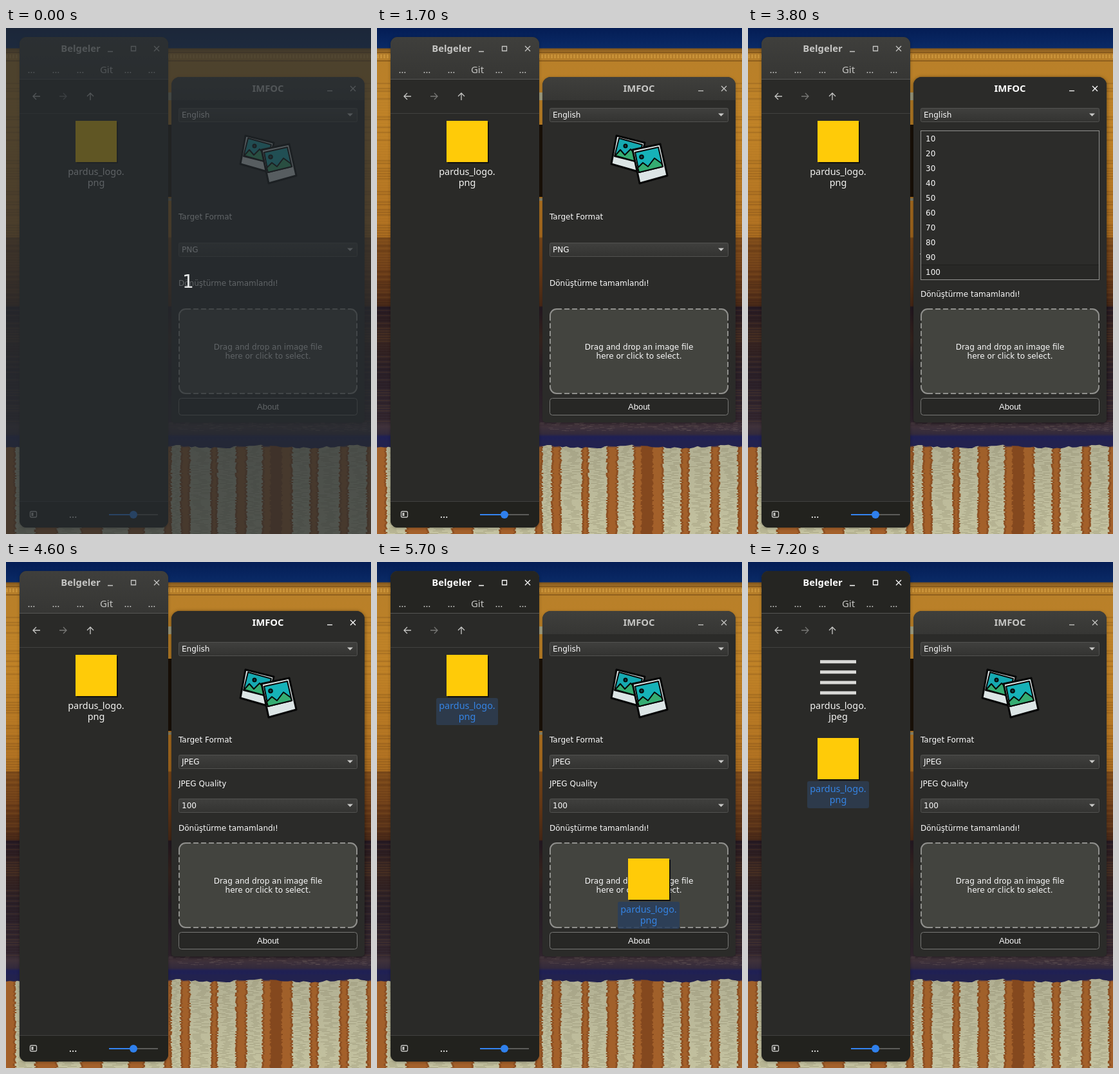
Write an HTML page with a canvas that moves like this. It is 567x785 px and loops after 8 s.

```html
<!DOCTYPE html>
<html lang="en">
<head>
<meta charset="utf-8">
<title>Image converter demo</title>
<style>
html, body { margin: 0; width: 100%; height: 100%; overflow: hidden; background: #1a1626; }
canvas, svg { position: absolute; left: 0; top: 0; width: 567px; height: 785px; }
svg { color: #c6c6c4; }
text { white-space: pre; }
.ui { font: 14.4px "Noto Sans", sans-serif; fill: #f4f4f2; text-anchor: middle; }
.menu { font-size: 15px; fill: #c4c4c2; }
.title { font-size: 14.8px; font-weight: 700; fill: currentColor; }
.app { font: 12px "DejaVu Sans", sans-serif; fill: #fafafa; }
.mid { text-anchor: middle; }
.line { fill: none; stroke: currentColor; stroke-width: 1.3; }
.blue { fill: #3584e4; }
.lit { color: #fff; }
.shadow { filter: drop-shadow(0 1px 2px rgba(0,0,0,.3)); }
.deep { filter: drop-shadow(0 1px 3px rgba(0,0,0,.3)); }

[id^="t-"] { animation: 8s step-end infinite; }
#t-veil { animation-name: veil; }
#t-right { animation-name: right; }
#t-left, #t-selected { animation-name: select; }
#t-plain { animation-name: plain; }
#t-short { animation-name: short; }
#t-long { animation-name: long; }
#t-press { animation-name: press; }
#t-formats { animation-name: formats; }
#t-levels { animation-name: levels; }
#t-glow { animation-name: glow; }
#t-tint { animation-name: tint; }
#t-item { animation-name: item; }
#t-result { animation-name: result; }
#t-drag { animation-name: drag; }
@keyframes veil { 0% { opacity: 1 } 1.25%, to { opacity: 0 } }
@keyframes right { 0% { opacity: 0 } 27.5% { opacity: 1 } 65%, to { opacity: 0 } }
@keyframes select { 0% { opacity: 0 } 65%, to { opacity: 1 } }
@keyframes plain { 0% { opacity: 1 } 65%, to { opacity: 0 } }
@keyframes short { 0% { opacity: 1 } 36.25%, to { opacity: 0 } }
@keyframes long { 0% { opacity: 0 } 36.25%, to { opacity: 1 } }
@keyframes press { 0% { opacity: 0 } 28.75% { opacity: 1 } 36.25%, to { opacity: 0 } }
@keyframes formats { 0% { opacity: 0 } 30% { opacity: .5 } 31.25% { opacity: 1 } 36.25%, to { opacity: 0 } }
@keyframes levels { 0% { opacity: 0 } 46.25% { opacity: .5 } 47.5% { opacity: 1 } 57.5%, to { opacity: 0 } }
@keyframes glow {
  0%, 21.25%, 66.25%, 80%, 90%, to { opacity: 0 }
  11.25%, 61.25%, 78.75%, 88.75% { opacity: 1 }
}
@keyframes tint { 0%, 21.25%, 65%, to { opacity: 0 } 11.25%, 61.25% { opacity: 1 } }
@keyframes item { 0% { transform: none } 75%, to { transform: translateY(129px) } }
@keyframes result { 0% { opacity: 0 } 75%, to { opacity: 1 } }
@keyframes drag {
  0% { opacity: 0; transform: none }
  66.25% { opacity: 1; transform: translate(26px, 30px) }
  67.5% { opacity: 1; transform: translate(92px, 104px) }
  68.75% { opacity: 1; transform: translate(180px, 204px) }
  70% { opacity: 1; transform: translate(252px, 284px) }
  71.25% { opacity: 1; transform: translate(282px, 316px) }
  72.5%, to { opacity: 0; transform: none }
}
</style>
</head>
<body>
<canvas id="wall" width="567" height="785"></canvas>
<svg viewBox="0 0 567 785">
  <defs>
    <linearGradient id="bar" x2="0" y2="1"><stop stop-color="#3f3f3c"/><stop offset="1" stop-color="#363634"/></linearGradient>
    <linearGradient id="box" x2="0" y2="1"><stop stop-color="#40403e"/><stop offset="1" stop-color="#333331"/></linearGradient>
    <path id="leftTop" d="M21 79V25a11 11 0 0 1 11-11H241a11 11 0 0 1 11 11V79z"/>
    <path id="pane" d="M257 89a13 13 0 0 1 13-13H544a13 13 0 0 1 13 13V607a5 5 0 0 1-5 5H262a5 5 0 0 1-5-5z" fill="#2b2b29"/>
    <path id="close" d="M-4-4 4 4M4-4-4 4"/>
    <path id="arrow" d="M6 0H-5M0-5-5 0 0 5"/>
    <g id="leftBar">
      <text class="ui title" x="116" y="37">Belgeler</text>
      <path class="line" d="M158 36.5h8M194.5 28.5h7v7h-7z"/>
      <use href="#close" class="line" x="234" y="32"/>
    </g>
    <g id="rightBar">
      <text class="ui title" x="407" y="99">IMFOC</text>
      <path class="line" d="M499 97.5h8"/>
      <use href="#close" class="line" x="539" y="94"/>
    </g>
    <g id="thumb"><path d="M110 146h64v64h-64z" fill="#11110f"/><path d="M108 144h64v64h-64z" fill="#ffcb08"/></g>
    <rect id="chip" x="92" y="211" width="96" height="42" rx="3"/>
    <g id="pngName"><text x="140" y="228">pardus_logo.</text><text x="140" y="245">png</text></g>
  </defs>

  <!-- File manager -->
  <rect class="shadow" x="21" y="14" width="231" height="761" rx="11" fill="#2a2a28"/>
  <use href="#leftTop" fill="url(#bar)"/>
  <use href="#leftBar"/>
  <g id="t-left"><use href="#leftTop" fill="#252522"/><use href="#leftBar" class="lit"/></g>
  <path d="M21 735H252V764a11 11 0 0 1-11 11H32a11 11 0 0 1-11-11z" fill="#22221e"/>
  <path d="M21 79.5H252" stroke="#565654"/>
  <path d="M21 132.5H252M21 734.5H252" stroke="#41413f"/>
  <g class="ui menu" id="menu"></g>
  <use href="#arrow" class="line" x="47" y="106"/>
  <use href="#arrow" class="line" transform="translate(89 106) scale(-1 1)" opacity=".5"/>
  <use href="#arrow" class="line" transform="translate(131 106) rotate(90)"/>
  <rect class="line" x="37.5" y="750" width="10" height="9" rx="2"/>
  <path d="M39.5 752h3v5h-3z" fill="#c6c6c4"/>
  <text class="ui" x="104" y="760" style="font-size:16px">…</text>
  <path d="M198 755h38" stroke="#5c5c59" stroke-width="2"/>
  <path d="M160 755h38" stroke="#3584f0" stroke-width="2"/>
  <circle cx="198" cy="755" r="6" fill="#2f80ed"/>

  <g id="t-result">
    <path d="M112 154.7h56m-56 16.1h56m-56 16.1h56m-56 16.1h56" stroke="#dadad8" stroke-width="5"/>
    <g class="ui"><text x="140" y="228">pardus_logo.</text><text x="140" y="245">jpeg</text></g>
  </g>
  <g id="t-item">
    <use href="#thumb"/>
    <g id="t-glow"><path d="M108 144h64v64h-64z" fill="#fff012"/></g>
    <g id="t-tint"><use href="#chip" fill="#fff" opacity=".07"/></g>
    <g id="t-plain" class="ui"><use href="#pngName"/></g>
    <g id="t-selected" class="ui blue"><use href="#chip" fill="#2d3a4b"/><use href="#pngName"/></g>
  </g>

  <!-- Converter -->
  <use href="#pane" class="shadow"/>
  <path d="M257 112V89a13 13 0 0 1 13-13H544a13 13 0 0 1 13 13V112z" fill="url(#bar)"/>
  <use href="#rightBar"/>
  <g id="t-right"><use href="#pane" class="deep"/><use href="#rightBar" class="lit"/></g>
  <g id="language"></g>

  <g stroke="#060606" stroke-width="3" stroke-linejoin="round">
    <path d="M372 167 416 178 406 223 364 211z" fill="#dce5e5"/>
    <g stroke-width="2">
      <path d="M376 171 412 181 405 208 369 199z" fill="#16a9b1"/>
      <path d="M370 198 378 189 385 197 394 188 407 202 405 208z" fill="#35ad72"/>
      <circle cx="386" cy="183" r="2.5" fill="#104c50"/>
    </g>
    <path d="M397 189 440 180 451 229 408 241z" fill="#dce5e5"/>
    <g stroke-width="2">
      <path d="M401 193 437 185 444 215 407 224z" fill="#16b2b8"/>
      <path d="M405 217 413 209 421 215 431 202 442 210 444 215 407 224z" fill="#35ad72"/>
      <circle cx="411" cy="200" r="2.8" fill="#104c50"/>
    </g>
  </g>

  <g id="t-short"></g>
  <g id="t-long"></g>
  <g id="t-press"><rect x="269" y="333" width="276" height="20" rx="2" fill="#000" opacity=".2"/></g>
  <rect x="269" y="436" width="276" height="131" rx="10" fill="#43443f"/>
  <g fill="none" stroke="#90908d" stroke-width="2">
    <path d="M269 446a10 10 0 0 1 10-10M535 436a10 10 0 0 1 10 10M545 557a10 10 0 0 1-10 10M279 567a10 10 0 0 1-10-10"/>
    <path d="M279 436H535M279 567H535M269 446V557M545 446V557" stroke-dasharray="8 4"/>
  </g>
  <g class="app mid">
    <text x="407" y="499">Drag and drop an image file</text>
    <text x="407" y="513">here or click to select.</text>
  </g>
  <rect x="268.5" y="574.5" width="277" height="26" rx="4" fill="#272725" stroke="#777775"/>
  <text class="mid" x="407" y="592" fill="#fafafa" font-family="Liberation Sans, Arial, sans-serif" font-size="13">About</text>
  <g id="t-formats"></g>
  <g id="t-levels"></g>

  <g id="t-drag" class="ui blue">
    <use href="#thumb"/>
    <use href="#chip" fill="#2a3f5c" opacity=".85"/>
    <use href="#pngName"/>
  </g>

  <g id="t-veil">
    <path d="M0 0h567v785H0z" fill="#252b2f" opacity=".73"/>
    <text x="283" y="403" class="mid" font-family="DejaVu Sans, sans-serif" font-size="28" fill="#e4e6e6">1</text>
  </g>
</svg>
<script>
const put = (id, markup) => document.getElementById(id).innerHTML += markup;
const label = (x, y, text) => `<text class="app" x="${x}" y="${y}">${text}</text>`;
const combo = (y, text) => `
  <rect x="268.5" y="${y + .5}" width="277" height="21" rx="2" fill="url(#box)" stroke="#525250"/>
  <path d="M530 ${y + 8.5}h9l-4.5 4.5z" fill="#c8c8c6"/>` + label(273, y + 15, text);
const list = (y, rows, current) => `
  <rect x="268.5" y="${y + .5}" width="277" height="${rows.length * 23 + 1}" fill="#2c2c2a" stroke="#92928f"/>
  <rect x="269" y="${y + 1 + current * 23}" width="276" height="23" fill="#282826"/>
  <path d="M269 ${y + .5 + (current ? current * 23 + 1 : 23)}h276" stroke="#1f1f1d"/>` +
  rows.map((row, i) => label(276, y + 17 + i * 23, row)).join("");

const menuItems = { 39.5: "…", 77.5: "…", 115.5: "…", 156: "Git", 189.5: "…", 226.5: "…" };
for (const x in menuItems) put("menu", `<text x="${x}" y="70">${menuItems[x]}</text>`);
put("language", combo(124, "English"));
put("t-short", label(268, 297, "Target Format") + combo(333, "PNG") + label(268, 400, "Dönüştürme tamamlandı!"));
put("t-long", label(268, 280, "Target Format") + combo(299, "JPEG") + label(268, 348, "JPEG Quality") +
  combo(367, "100") + label(268, 417, "Dönüştürme tamamlandı!"));
put("t-formats", list(332, ["PNG", "JPEG", "GIF", "BMP", "TIFF", "WEBP"], 0));
put("t-levels", list(159, Array.from({ length: 10 }, (_, i) => (i + 1) * 10), 9));

// Soft wallpaper: sky, ochre facade, dark bank, reflections
const ctx = document.getElementById("wall").getContext("2d");
let seed = 7;
const random = () => (seed = seed * 16807 % 2147483647) / 2147483647;
const fill = (color, x, y, w, h) => { ctx.fillStyle = color; ctx.fillRect(x, y, w, h); };
const bands = [[0, "#041d55"], [31, "#0a2a66"], [32, "#80551c"], [39, "#b07a2a"], [54, "#b98029"], [160, "#bd8026"],
  [324, "#ab6d20"], [326, "#7c4a1a"], [380, "#6a3c18"], [431, "#4a2a18"], [433, "#251a24"], [480, "#3a2620"],
  [530, "#2a2028"], [610, "#332730"], [618, "#40323a"], [630, "#332a3c"], [634, "#1f2054"], [648, "#232252"],
  [651, "#a0602a"], [785, "#a4602a"]];
const fade = ctx.createLinearGradient(0, 0, 0, 785);
bands.forEach(([y, color]) => fade.addColorStop(y / 785, color));
fill(fade, 0, 0, 567, 785);
for (let x = 0; x < 567; x += 5) fill("rgba(215,160,65,.6)", x, 41, 3, 6);
for (const y of [37, 50]) fill("rgba(70,38,8,.35)", 0, y, 567, 2);
for (let y = 85; y < 610; y += 4) {
  const tone = random() < .5 ? "rgba(20,8,8,.1)" : "rgba(240,170,60,.06)";
  fill(tone, 0, y, 21, 2);
  fill(tone, 557, y, 10, 2);
}
fill("#a4a283", 250, 100, 8, 12);
fill("#1c1209", 250, 150, 8, 112);
fill("#8c8568", 250, 264, 8, 4);
for (let i = 0; i < 130; i++) fill("rgba(120,105,100,.3)", 252 + random() * 315, 612 + random() * 13, 7, 1);

const pillars = [[15, 30], [80, 36], [150, 40], [215, 30], [257, 14], [286, 32], [329, 28], [374, 24], [445, 27], [485, 33], [532, 28]];
const pale = ctx.createLinearGradient(0, 650, 0, 785);
pale.addColorStop(0, "#b2b093");
pale.addColorStop(1, "#c4c2a0");
for (let y = 646; y < 785; y += 2) {
  for (const [x, w] of pillars) {
    const shift = (random() - .5) * 3;
    fill("rgba(120,65,28,.5)", x - 3 + shift, y, w + 6, 2);
    fill(pale, x + shift, y, w, 2);
    fill("rgba(95,90,60,.25)", x + random() * w * .6, y, w * .4, 1);
  }
  fill("#84481e", 409 + random() * 3, y, 18, 2);
}
ctx.fillStyle = "#22224f";
ctx.beginPath();
ctx.moveTo(0, 640);
for (let x = 0; x <= 567; x += 6) ctx.lineTo(x, 648 + 2 * Math.sin(x / 23) + random() * 3);
ctx.lineTo(567, 640);
ctx.fill();
</script>
</body>
</html>
```
